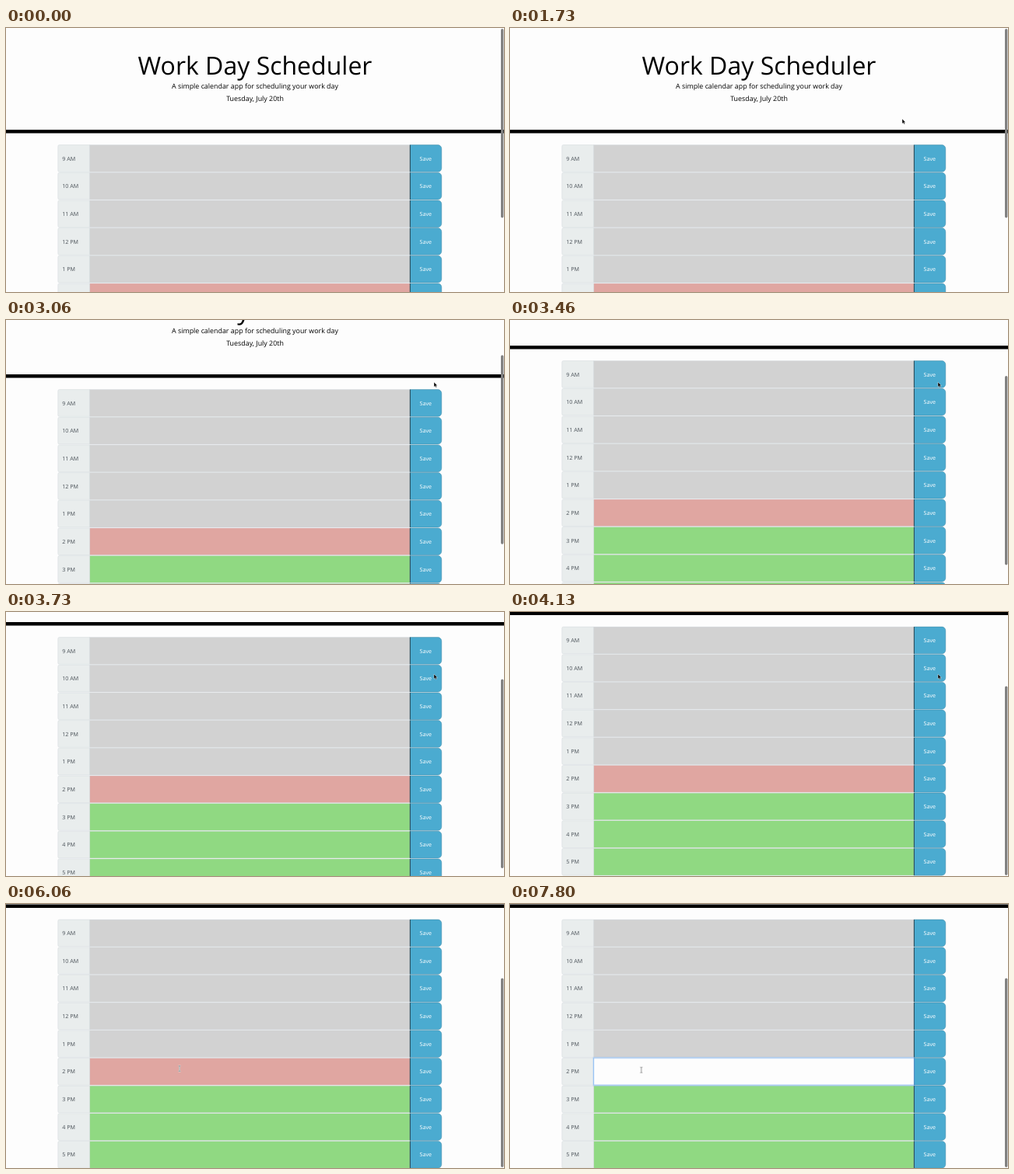
Animation of 640x340 px, one loop 8 s. Source, as an HTML page:

```html
<!DOCTYPE html>
<html lang="en">
<head>
<meta charset="utf-8">
<title>Work Day Scheduler</title>
<style>
@property --scroll { syntax: "<number>"; inherits: true; initial-value: 0; }

html, body { margin: 0; width: 100%; height: 100%; overflow: hidden; background: #fdfdfd; }
svg { display: block; width: 640px; height: 340px; font-family: "Open Sans", sans-serif; text-rendering: geometricPrecision; }

svg, #cursor, .arrow, .hand, .beam, #hover, #focus, #caret { animation: 8s step-end infinite; }
svg { animation-name: scroll; }
#page { transform: translateY(calc(var(--scroll) * -1px)); }
#thumb { transform: translateY(calc(min(var(--scroll), 130.5) * .724px)); }

.title { font-size: 32px; }
.lead { font-size: 8.89px; }
.title, .lead, .save { text-anchor: middle; }
.hour, .save { font-size: 7.11px; }
.hour { fill: #495057; }
.save { fill: #fff; }
.label { fill: #e9eded; stroke: #ced4da; stroke-width: .45; }
.past { fill: #d2d2d2; }
.present { fill: #e0a6a1; }
.future { fill: #90d982; }
.slot { stroke: #ced4da; stroke-width: .45; }
.button { fill: #4babd0; stroke: #3c819c; stroke-width: .45; }
.edge { fill: #16303a; }

#cursor { animation-name: move; }
.arrow { animation-name: arrow; }
.hand { animation-name: hand; }
.beam { animation-name: beam; }
#hover { animation-name: hover; animation-timing-function: linear; }
#focus { animation-name: focus; animation-timing-function: linear; }
#caret { animation-name: caret; }

@keyframes scroll {
  0% { --scroll: 0; }
  30% { --scroll: 2; }
  30.7% { --scroll: 6; }
  31.6% { --scroll: 11; }
  34.1% { --scroll: 30; }
  35.7% { --scroll: 45; }
  38.2% { --scroll: 61; }
  41.6% { --scroll: 85; }
  43.2% { --scroll: 98; }
  45% { --scroll: 110; }
  46.6% { --scroll: 118; }
  47.5% { --scroll: 122; }
  48.2% { --scroll: 125; }
  50% { --scroll: 129; }
  50.7% { --scroll: 130.5; }
  51.6% { --scroll: 131.5; }
  52.5% { --scroll: 132; }
  59.1% { --scroll: 131.5; }
  65% { --scroll: 131; }
  69.1%, 100% { --scroll: 130.5; }
}
@keyframes move {
  0%, 18.2% { transform: translate(468px, 147px); }
  20% { transform: translate(486px, 131px); }
  21.6% { transform: translate(504px, 117px); }
  24.1% { transform: translate(526px, 99px); }
  25% { transform: translate(541px, 87px); }
  26.6% { transform: translate(550px, 80px); }
  59.1% { transform: translate(556px, 87px); }
  60% { transform: translate(572px, 101px); }
  60.7% { transform: translate(585px, 111px); }
  61.6% { transform: translate(588px, 122px); }
  62.5% { transform: translate(580px, 136px); }
  63.2% { transform: translate(545px, 152px); }
  64.1% { transform: translate(480px, 170px); }
  65% { transform: translate(410px, 185px); }
  65.7% { transform: translate(350px, 196px); }
  66.6% { transform: translate(300px, 203px); }
  67.5% { transform: translate(265px, 208px); }
  68.2% { transform: translate(245px, 211px); }
  69.1% { transform: translate(233px, 212px); }
  70% { transform: translate(228px, 212px); }
  74.1% { transform: translate(224px, 212px); }
  75.7% { transform: translate(223px, 212px); }
  77.5% { transform: translate(196px, 213px); }
  78.3% { transform: translate(176px, 214px); }
  79.1%, 100% { transform: translate(168.7px, 213.7px); }
}
@keyframes arrow {
  0% { opacity: 0; }
  18.2% { opacity: 1; }
  52.5% { opacity: 0; }
  61.6% { opacity: 1; }
  64.1%, 100% { opacity: 0; }
}
@keyframes hand {
  0% { opacity: 0; }
  52.5% { opacity: 1; }
  61.6%, 100% { opacity: 0; }
}
@keyframes beam {
  0% { opacity: 0; }
  64.1%, 100% { opacity: 1; }
}
@keyframes hover {
  0%, 52% { opacity: 0; }
  54%, 61.2% { opacity: 1; }
  63%, 100% { opacity: 0; }
}
@keyframes focus {
  0%, 78.3% { opacity: 0; }
  80.2%, 100% { opacity: 1; }
}
@keyframes caret {
  0% { opacity: 0; }
  78.3% { opacity: 1; }
  85% { opacity: 0; }
  91.6% { opacity: 1; }
  97.4%, 100% { opacity: 0; }
}
</style>
</head>
<body>
<svg viewBox="0 0 640 340">
  <defs>
    <path id="stem" d="M-1.4 -3.6Q0 -3.6 0 -2.8Q0 -3.6 1.4 -3.6M0 -2.8V2.8M-1.4 3.6Q0 3.6 0 2.8Q0 3.6 1.4 3.6" fill="none"/>
  </defs>
  <g id="page">
    <text class="title" x="320" y="59.6">Work Day Scheduler</text>
    <text class="lead" x="320" y="77.9">A simple calendar app for scheduling your work day</text>
    <text class="lead" x="320" y="93.9">Tuesday, July 20th</text>
    <rect y="131" width="640" height="4.5"/>
    <g id="rows"></g>
  </g>
  <rect id="thumb" x="636" y="1" width="3.4" height="243.5" rx="1.7" fill="#818181"/>
  <g id="cursor">
    <path class="arrow" d="M0 0V6.2L1.5 4.9 2.5 7 3.5 6.5 2.6 4.5H4.4Z" stroke="#fff" stroke-width=".4"/>
    <path class="hand" d="M-1.2 -1Q-.4 -1.8 .2 -1V1.2L2.4 1.6Q3.2 1.8 3 2.8L2.4 5H-.8L-2.6 2.6Q-2.8 1.6 -1.2 2.2Z" fill="#fff" stroke="#444" stroke-width=".7"/>
    <g class="beam">
      <use href="#stem" stroke="#fff" stroke-width="1.6"/>
      <use href="#stem" stroke="#606060" stroke-width=".7"/>
    </g>
  </g>
</svg>
<script>
const hours = ["9 AM", "10 AM", "11 AM", "12 PM", "1 PM", "2 PM", "3 PM", "4 PM", "5 PM"];
const FIRST = 150.6, PITCH = 35.67, HEIGHT = 34.7;
const HOVERED = 1, CURRENT = 5;
const rowTop = i => FIRST + i * PITCH;

const buttonShape = y =>
  `M519.3 ${y}H555a4.8 4.8 0 0 1 4.8 4.8v${HEIGHT - 9.6}a4.8 4.8 0 0 1 -4.8 4.8H519.3Z`;

const slotRect = (y, attrs) =>
  `<rect x="107.8" y="${y}" width="411.3" height="${HEIGHT}" ${attrs}/>`;

function row(hour, i) {
  const y = rowTop(i);
  const state = i < CURRENT ? "past" : i > CURRENT ? "future" : "present";
  const hover = i === HOVERED
    ? `<path id="hover" d="${buttonShape(y)}" fill="#6c757d" stroke="#50585e" stroke-width=".45"/>` : "";
  return `
    <path class="label" d="M107.6 ${y}H68.6a1.8 1.8 0 0 0 -1.8 1.8v${HEIGHT - 3.6}a1.8 1.8 0 0 0 1.8 1.8H107.6Z"/>
    <text class="hour" x="72.3" y="${y + 19.9}">${hour}</text>
    ${slotRect(y, `class="slot ${state}"`)}
    <path class="button" d="${buttonShape(y)}"/>${hover}
    <rect class="edge" x="518.9" y="${y}" width=".8" height="${HEIGHT}"/>
    <text class="save" x="539.3" y="${y + 19.9}">Save</text>`;
}

function focusedSlot() {
  const y = rowTop(CURRENT);
  return `<g id="focus">
    ${slotRect(y, 'fill="none" stroke="#007bff" stroke-opacity=".25" stroke-width="2.4"')}
    ${slotRect(y, 'fill="#fdfdfd" stroke="#80bdff" stroke-width=".6"')}
  </g>
  <rect id="caret" x="113.2" y="${y + 3.4}" width=".6" height="8.4" fill="#495057"/>`;
}

document.getElementById("rows").innerHTML = hours.map(row).join("") + focusedSlot();
</script>
</body>
</html>
```
